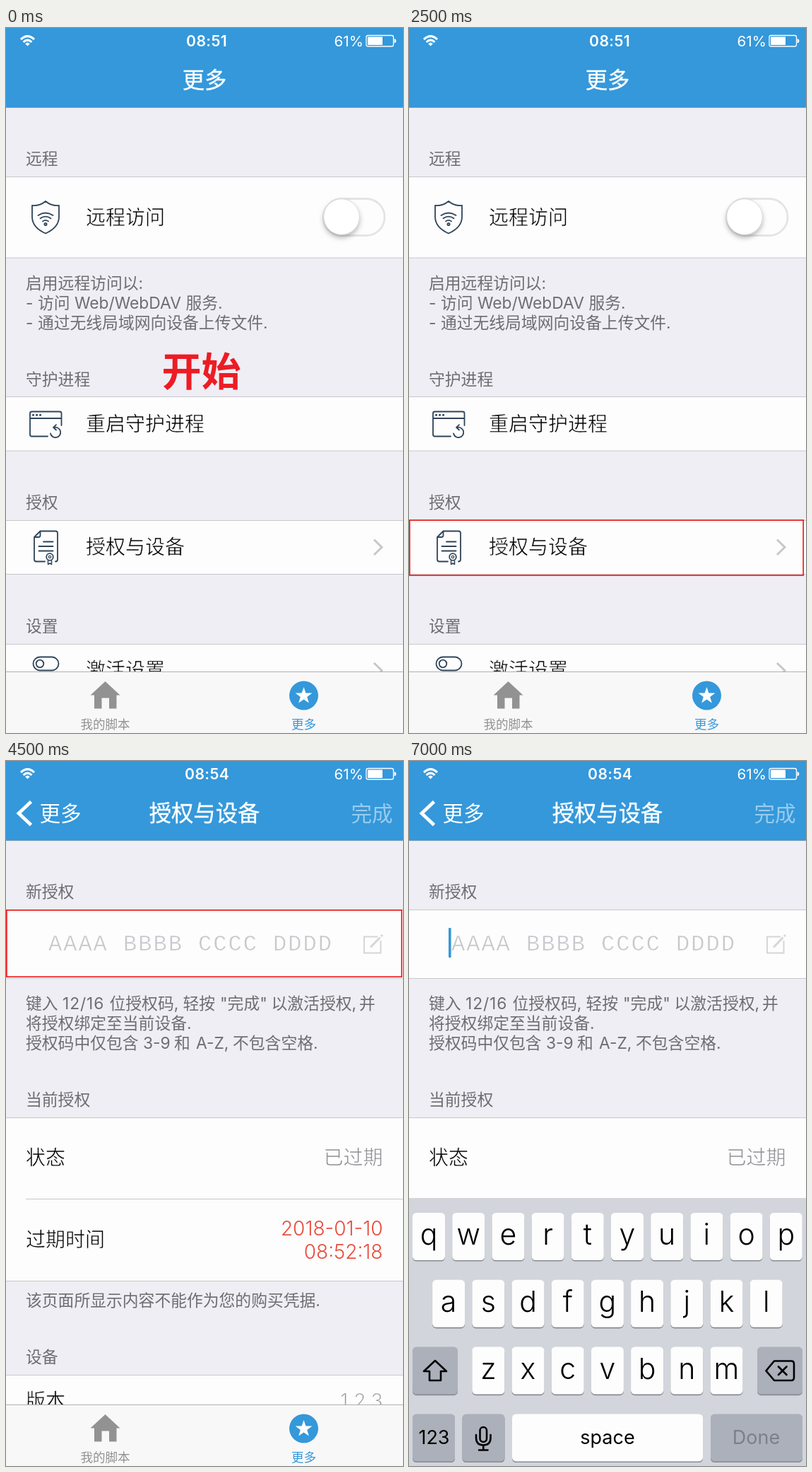
An HTML page for the animation above (8 s loop, 562 by 997 pixels).

```html
<!DOCTYPE html>
<html lang="zh-CN">
<head>
<meta charset="utf-8">
<title>授权与设备</title>
<style>
html, body { margin: 0; width: 100%; height: 100%; overflow: hidden; background: #efeef4; }
svg { display: block; width: 562px; height: 997px; }
text { font-family: Inter, "Noto Sans CJK SC", sans-serif; white-space: pre; }
/* a stroke in the cell colour thins the glyphs to a light weight */
.row, .value, .code { font-weight: 300; stroke: #fdfdfd; stroke-width: .6; }
.label { font-size: 22.8px; fill: #6d6d72; }
.row { font-size: 28px; fill: #000; }
.value { font-size: 28px; fill: #8e8e93; text-anchor: end; }
.due { fill: #e74c3c; stroke: none; }
.title { font-size: 31.3px; font-weight: 500; fill: #fff; stroke: #fff; stroke-width: .4; text-anchor: middle; }
.nav { font-size: 29.6px; fill: #fff; }
.clock { font-size: 21.2px; font-weight: 600; fill: #fff; letter-spacing: .4px; }
.tab { font-size: 17.5px; text-anchor: middle; }
.code { font-family: "Liberation Mono", monospace; font-size: 32px; letter-spacing: 2px; fill: #c7c7cd; }
.start { font-size: 56px; font-weight: 700; fill: #ed1c24; text-anchor: middle; }
.cell { fill: #fdfdfd; stroke: #c8c7cc; }
.icon { fill: none; stroke: #2f4459; stroke-width: 1.8; stroke-linecap: round; stroke-linejoin: round; }
.arrow { fill: none; stroke: #c7c7cc; stroke-width: 3; }
.mark { fill: none; stroke: #ee1c1c; stroke-width: 1.7; }
.key { text-anchor: middle; font-weight: 300; font-size: 41px; }
.glyph { fill: none; stroke: #000; stroke-width: 2.6; stroke-linejoin: round; stroke-linecap: round; }
</style>
</head>
<body>
<svg viewBox="0 0 562 997">
  <defs>
    <filter id="soft" x="-30%" y="-30%" width="160%" height="170%">
      <feDropShadow dx="0" dy="4" stdDeviation="3.5" flood-color="#000" flood-opacity=".28"/>
    </filter>
  </defs>

  <rect width="562" height="997" fill="#efeef4"/>
  <rect width="562" height="112" fill="#3498db"/>
  <path d="M0 112.5H562" stroke="#7f9fb8"/>

  <!-- status bar -->
  <g fill="none" stroke="#fff" stroke-width="3.1">
    <path d="M21 16.2Q30.5 7.2 40 16.2M24.6 20Q30.5 14.4 36.4 20"/>
    <path d="M27.2 22.2Q30.5 19 33.8 22.2L30.5 25.6Z" fill="#fff" stroke="none"/>
    <rect x="510" y="10.5" width="38.5" height="15.5" rx="2.5" stroke-width="1.3"/>
    <path d="M512 12.5H533V24H512ZM549.6 15.3Q552.4 15.6 552.4 18.2T549.6 21.2Z" fill="#fff" stroke="none"/>
  </g>
  <text x="464.5" y="25.6" font-size="20.6" fill="#fff">61%</text>

  <!-- settings list -->
  <g id="list">
    <text class="clock" x="255" y="25.6">08:51</text>
    <text class="title" x="281" y="84.6">更多</text>

    <text class="label" x="28" y="193">远程</text>
    <rect class="cell" x="-2" y="210.5" width="566" height="114.5"/>
    <g class="icon">
      <path d="M56 245C50 250 43 251.5 37 251V267C37 279 46 286 56 290.5C66 286 75 279 75 267V251C69 251.5 62 250 56 245Z"/>
      <path d="M45.5 265Q56 258 66.5 265M48.5 269.3Q56 264 63.5 269.3M52 273.4Q56 270.4 60 273.4"/>
      <circle cx="56" cy="277.4" r="1.6"/>
    </g>
    <text class="row" x="113" y="277.5">远程访问</text>
    <rect x="449.5" y="241.5" width="86.5" height="52" rx="26" fill="#fdfdfd" stroke="#e4e4e6" stroke-width="2.8"/>
    <circle cx="475" cy="267" r="25.3" fill="#fff" stroke="#d2d2d4" stroke-width=".8" filter="url(#soft)"/>

    <text class="label" y="368.5"><tspan x="28">启用远程访问以:</tspan><tspan x="28" dy="28">- 访问</tspan><tspan x="97">Web/WebDAV</tspan><tspan x="254.5">服务.</tspan><tspan x="28" dy="28">- 通过无线局域网向设备上传文件.</tspan></text>

    <text class="label" x="28" y="504.5">守护进程</text>
    <rect class="cell" x="-2" y="521.5" width="566" height="76.5"/>
    <g class="icon">
      <path d="M59 577.5H36.5Q34 577.5 34 575V545Q34 542.5 36.5 542.5H76Q78.5 542.5 78.5 545V562M34 552H78.5"/>
      <path d="M63 573.5A7.2 7.2 0 1 0 69 564.8H67M71 561.2L67 564.8L71 568.5"/>
      <path d="M38.5 547.3h.1M43.5 547.3h.1M48.5 547.3h.1" stroke-width="3"/>
    </g>
    <text class="row" x="113" y="569.5">重启守护进程</text>

    <text class="label" x="28" y="679">授权</text>
    <rect class="cell" x="-2" y="696.5" width="566" height="76"/>
    <g class="icon">
      <path d="M55 754.5H43Q40 754.5 40 751.5V720L48.5 711.5H70Q73 711.5 73 714.5V751.5Q73 754.5 70 754.5M40 720H46Q48.5 720 48.5 717.5V711.5"/>
      <path d="M53 726.5H66.5M46.5 733H66.5M46.5 739.5H66.5"/>
      <circle cx="62" cy="748" r="4.8"/>
      <circle cx="62" cy="748" r="1.7" stroke-width="1.2"/>
      <path d="M59.5 753.5V758.5L62 757L64.5 758.5V753.5" stroke-width="1.5"/>
    </g>
    <text class="row" x="113" y="744">授权与设备</text>
    <path class="arrow" d="M521 723.5L532 734.3L521 745"/>

    <text class="label" x="28" y="854">设置</text>
    <rect class="cell" x="-2" y="871.5" width="566" height="76"/>
    <g class="icon">
      <rect x="38.5" y="889.5" width="36" height="19" rx="9.5"/>
      <circle cx="48" cy="899" r="5.3"/>
    </g>
    <text class="row" x="113" y="918">激活设置</text>
    <path class="arrow" d="M521 898L532 908.8L521 919.5"/>

    <text id="begin" class="start" x="276.5" y="505.8">开始</text>
    <rect id="pick" class="mark" x=".9" y="696" width="557.3" height="78"/>
  </g>

  <!-- licence page -->
  <g id="licence">
    <text class="clock" x="253" y="25.6">08:54</text>
    <path d="M35.5 57.5L18 74L35.5 90.5" fill="none" stroke="#fff" stroke-width="4.8"/>
    <text class="nav" x="47.5" y="85">更多</text>
    <text class="title" x="281" y="84.6">授权与设备</text>
    <text class="nav" x="488.5" y="85" opacity=".5">完成</text>

    <text class="label" x="28" y="193">新授权</text>
    <rect class="cell" x="-2" y="210.5" width="566" height="97"/>
    <text class="code" x="60" y="267.5">AAAA BBBB CCCC DDDD</text>
    <g fill="none" stroke="#d6d6d9" stroke-width="2">
      <path d="M526 248.5H507V271.5H530.5V254"/>
      <path d="M516 263.5L529.5 249.5M531 248L533 246" stroke-width="3"/>
    </g>

    <text class="label" y="350.5"><tspan x="28">键入</tspan><tspan x="80" letter-spacing=".9">12/16</tspan><tspan x="146.5">位授权码,</tspan><tspan x="250.5">轻按</tspan><tspan x="303">"完成"</tspan><tspan x="375.5">以激活授权,</tspan><tspan x="500">并</tspan><tspan x="28" dy="28">将授权绑定至当前设备.</tspan><tspan x="28" dy="28">授权码中仅包含</tspan><tspan x="194">3-9</tspan><tspan x="238">和</tspan><tspan x="269">A-Z,</tspan><tspan x="321">不包含空格.</tspan></text>

    <text class="label" x="28" y="487">当前授权</text>
    <rect class="cell" x="-2" y="504.5" width="566" height="231"/>
    <path d="M28 619.5H562" stroke="#c8c7cc"/>
    <text class="row" x="28" y="571">状态</text>
    <text class="value" x="533.5" y="571">已过期</text>
    <text class="row" x="28" y="687">过期时间</text>
    <text class="value due" x="533.5" y="671">2018-01-10</text>
    <text class="value due" x="533.5" y="704">08:52:18</text>
    <text class="label" x="28" y="771">该页面所显示内容不能作为您的购买凭据.</text>

    <text class="label" x="28" y="851">设备</text>
    <rect class="cell" x="-2" y="868.5" width="566" height="76"/>
    <text class="row" x="28" y="914.5">版本</text>
    <text class="value" x="533.5" y="915">1.2.3</text>

    <rect id="field" class="mark" x=".9" y="210.9" width="559.3" height="94.3"/>
  </g>

  <!-- tab bar -->
  <rect y="910" width="562" height="87" fill="#f8f8f8"/>
  <path d="M0 910.5H562" stroke="#b0b0b3"/>
  <path d="M140.5 924L161.5 943.5H156.5V962.5H146V947.5H135.5V962.5H125V943.5H119.5Z" fill="#929292"/>
  <text class="tab" x="140.5" y="990.7" fill="#929292">我的脚本</text>
  <circle cx="421.5" cy="944" r="20.5" fill="#3498db"/>
  <path d="M421.5 932L424.4 940.5L433.4 940.6L426.2 946L428.8 954.6L421.5 949.4L414.2 954.6L416.8 946L409.6 940.6L418.6 940.5Z" fill="#fff"/>
  <text class="tab" x="421.5" y="990.7" fill="#3498db">更多</text>

  <!-- keyboard and caret -->
  <g id="typing">
    <rect x="56" y="236" width="3.6" height="42" rx="1" fill="#3498db"/>
    <rect y="618" width="562" height="379" fill="#d2d5db"/>
    <g id="keys"></g>
    <g class="glyph">
      <path d="M37 848L53 863H45V876H29V863H21Z"/>
      <path d="M517 848.5H541Q545 848.5 545 852.5V872Q545 876 541 876H517L505.5 862.3ZM523 856.5L534.5 868M534.5 856.5L523 868"/>
      <rect x="100.5" y="942" width="9.5" height="21" rx="4.75"/>
      <path d="M95 953V957Q95 967.5 105.25 967.5T115.5 957V953M105.25 968V974M99 974.5H111.5"/>
    </g>
  </g>
</svg>
<script>
const LOOP = 8000;
const $ = id => document.getElementById(id);

function add(tag, attrs, text = "") {
  const el = document.createElementNS("http://www.w3.org/2000/svg", tag);
  for (const name in attrs) el.setAttribute(name, attrs[name]);
  el.textContent = text;
  $("keys").append(el);
}

function addKey(x, y, width, fill = "#fdfdfd") {
  const box = { x, width, height: 67, rx: 5.5 };
  add("rect", { ...box, y: y + 1.6, fill: "#888b91" });
  add("rect", { ...box, y, fill });
}

function addWord(x, word, fill = "#000") {
  add("text", { class: "key", x, y: 965.5, style: "font-size:27px;font-weight:400", fill }, word);
}

const GREY = "#abb0ba";
[["qwertyuiop", 5], ["asdfghjkl", 33.1], ["zxcvbnm", 89.3]].forEach(([letters, left], r) => {
  const y = 639 + r * 94.8;
  [...letters].forEach((letter, i) => {
    const x = left + i * 56.2;
    addKey(x, y, 46);
    add("text", { class: "key", x: x + 23, y: y + 45 }, letter);
  });
});
addKey(5, 828.6, 64, GREY);
addKey(493, 828.6, 64, GREY);
addKey(5, 923.4, 60, GREY);
addKey(75.5, 923.4, 60, GREY);
addKey(146, 923.4, 270);
addKey(427, 923.4, 130, GREY);
addWord(35.5, "123");
addWord(281, "space");
addWord(491.5, "Done", "#7b8089");

// visible spans in ms
const spans = {
  list: [[0, 4000]],
  begin: [[0, 1000]],
  pick: [[1500, 2000], [2500, 4000]],
  licence: [[4000, LOOP]],
  field: [[4500, 5000], [5500, 7000]],
  typing: [[7000, LOOP]]
};

function show() {
  const now = performance.now() % LOOP;
  for (const id in spans) {
    const on = spans[id].some(([from, to]) => now >= from && now < to);
    $(id).style.display = on ? "" : "none";
  }
  requestAnimationFrame(show);
}
show();
</script>
</body>
</html>
```
